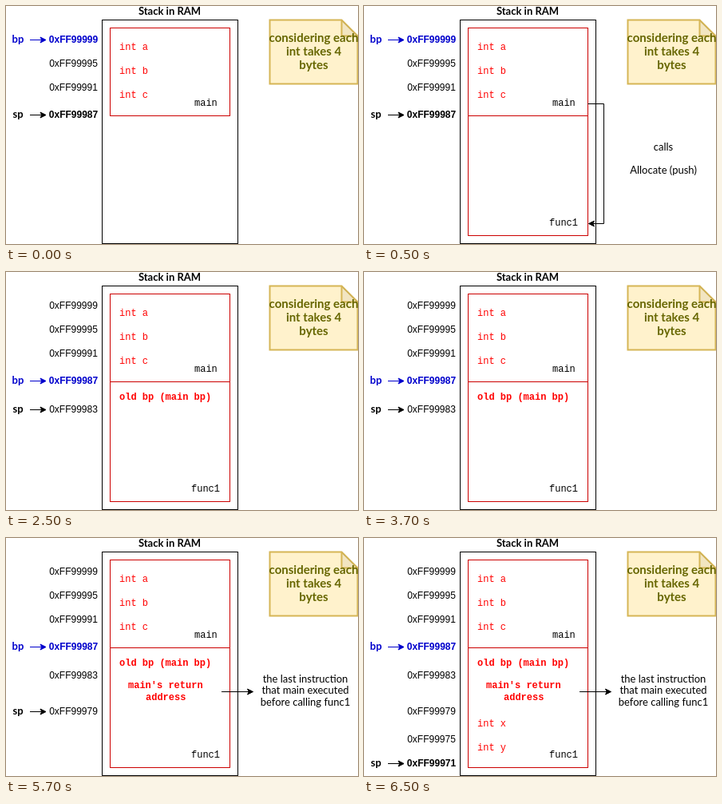
These frames come from a looping animation (441 px wide and 298 px high, 8000 ms). An HTML page with a canvas:

```html
<!DOCTYPE html>
<html lang="en">
<head>
<meta charset="utf-8">
<title>Stack in RAM</title>
<style>
  html, body { margin: 0; width: 100%; height: 100%; overflow: hidden; background: #fff; }
  canvas { display: block; }
</style>
</head>
<body>
<canvas id="stage" width="441" height="298"></canvas>
<script>
const ctx = document.getElementById('stage').getContext('2d');
const LOOP = 8000;
const STARTS = [0, 500, 2500, 4500, 6500];
const BLUE = '#0000cc', RED = '#ff0000', FRAME = '#cc0000', BLACK = '#000';
const SANS = '"Liberation Sans", Arial, sans-serif';
const MONO = '"Liberation Mono", "Courier New", monospace';
const HAND = 'Lato, sans-serif';

// Address rows: vertical centre of each stack slot
const ROWS = [42, 72, 102, 136, 172, 217, 252, 282];
const ADDRESSES = ROWS.map((y, i) => '0xFF999' + (99 - 4 * i));

// Per step: rows shown, base and stack pointer rows, bold stack address
const STEPS = [
  { rows: [0, 1, 2, 3], bp: 0, sp: 3, boldSp: true },
  { rows: [0, 1, 2, 3], bp: 0, sp: 3, boldSp: true },
  { rows: [0, 1, 2, 3, 4], bp: 3, sp: 4 },
  { rows: [0, 1, 2, 3, 4, 5], bp: 3, sp: 5 },
  { rows: [0, 1, 2, 3, 4, 5, 6, 7], bp: 3, sp: 7, boldSp: true }
];

function text(str, x, y, font, color = BLACK, align = 'center') {
  ctx.font = font;
  ctx.fillStyle = color;
  ctx.textAlign = align;
  ctx.fillText(str, x, y);
}

const hand = (str, x, y, bold, color, size = 13) =>
  text(str, x, y, `${bold ? 'bold ' : ''}${size}px ${HAND}`, color);

const mono = (str, x, y, color, bold) =>
  text(str, x, y, `${bold ? 'bold ' : ''}12px ${MONO}`, color, 'left');

function trace(points) {
  ctx.beginPath();
  points.forEach(([x, y]) => ctx.lineTo(x, y));
}

function box(x, y, w, h, color) {
  ctx.strokeStyle = color;
  ctx.lineWidth = 1;
  ctx.strokeRect(x + .5, y + .5, w, h);
}

// Polyline ending in a notched arrowhead; the last segment is horizontal
function arrow(points, color = BLACK) {
  const [tip, prev] = [points[points.length - 1], points[points.length - 2]];
  const dir = Math.sign(tip[0] - prev[0]);
  const [x, y] = tip;
  ctx.strokeStyle = ctx.fillStyle = color;
  ctx.lineWidth = 1;
  trace([...points.slice(0, -1), [x - dir * 5, y]]);
  ctx.stroke();
  trace([[x, y], [x - dir * 7, y - 3.5], [x - dir * 5.25, y], [x - dir * 7, y + 3.5]]);
  ctx.closePath();
  ctx.fill();
  ctx.stroke();
}

function note() {
  ctx.strokeStyle = '#d6b656';
  ctx.lineWidth = 2;
  trace([[330.5, 17.5], [420.5, 17.5], [440.5, 37.5], [440.5, 97.5], [330.5, 97.5]]);
  ctx.closePath();
  ctx.fillStyle = '#fff2cc';
  ctx.fill();
  ctx.stroke();
  trace([[420.5, 17.5], [420.5, 37.5], [440.5, 37.5]]);
  ctx.fillStyle = 'rgba(0,0,0,.05)';
  ctx.fill();
  ctx.stroke();
  ['considering each', 'int takes 4', 'bytes'].forEach((line, i) =>
    hand(line, 385.5, 45 + 17 * i, true, '#666600', 15));
}

function pointer(name, row, color) {
  const y = ROWS[row];
  hand(name, 15, y + 4, true, color);
  arrow([[30, y + .5], [50, y + .5]], color);
}

function draw(n) {
  const step = STEPS[n];
  ctx.fillStyle = '#fff';
  ctx.fillRect(0, 0, 441, 298);

  hand('Stack in RAM', 205, 11, true);
  box(120, 17, 170, 280, BLACK);
  box(130, 27, 150, 110, FRAME);
  ['a', 'b', 'c'].forEach((v, i) => mono('int ' + v, 142, 55 + 30 * i, RED));
  mono('main', 236, 125);
  note();

  for (const r of step.rows) {
    const bold = r === step.bp || (r === step.sp && step.boldSp);
    text(ADDRESSES[r], 84.5, ROWS[r] + 4, `${bold ? 'bold ' : ''}12px ${SANS}`,
      r === step.bp ? BLUE : BLACK);
  }
  pointer('bp', step.bp, BLUE);
  pointer('sp', step.sp, BLACK);

  if (n >= 1) {
    box(130, 137, 150, 150, FRAME);
    mono('func1', 232, 275);
  }
  if (n === 1) {
    arrow([[280.5, 122.5], [300.5, 122.5], [300.5, 272.5], [281.5, 272.5]]);
    hand('calls', 375, 181);
    hand('Allocate (push)', 375, 210);
  }
  if (n >= 2) mono('old bp (main bp)', 142, 160, RED, true);
  if (n >= 3) {
    mono("main's return", 153, 188, RED, true);
    mono('address', 175, 203, RED, true);
    arrow([[270, 192.5], [309.5, 192.5]]);
    ['the last instruction', 'that main executed', 'before calling func1'].forEach((line, i) =>
      hand(line, 375, 181 + 14.4 * i));
  }
  if (n >= 4) {
    mono('int x', 142, 236, RED);
    mono('int y', 142, 266, RED);
  }
}

const origin = performance.now();
function tick() {
  const t = (performance.now() - origin) % LOOP;
  draw(STARTS.filter(s => s <= t).length - 1);
  requestAnimationFrame(tick);
}
tick();
</script>
</body>
</html>
```
